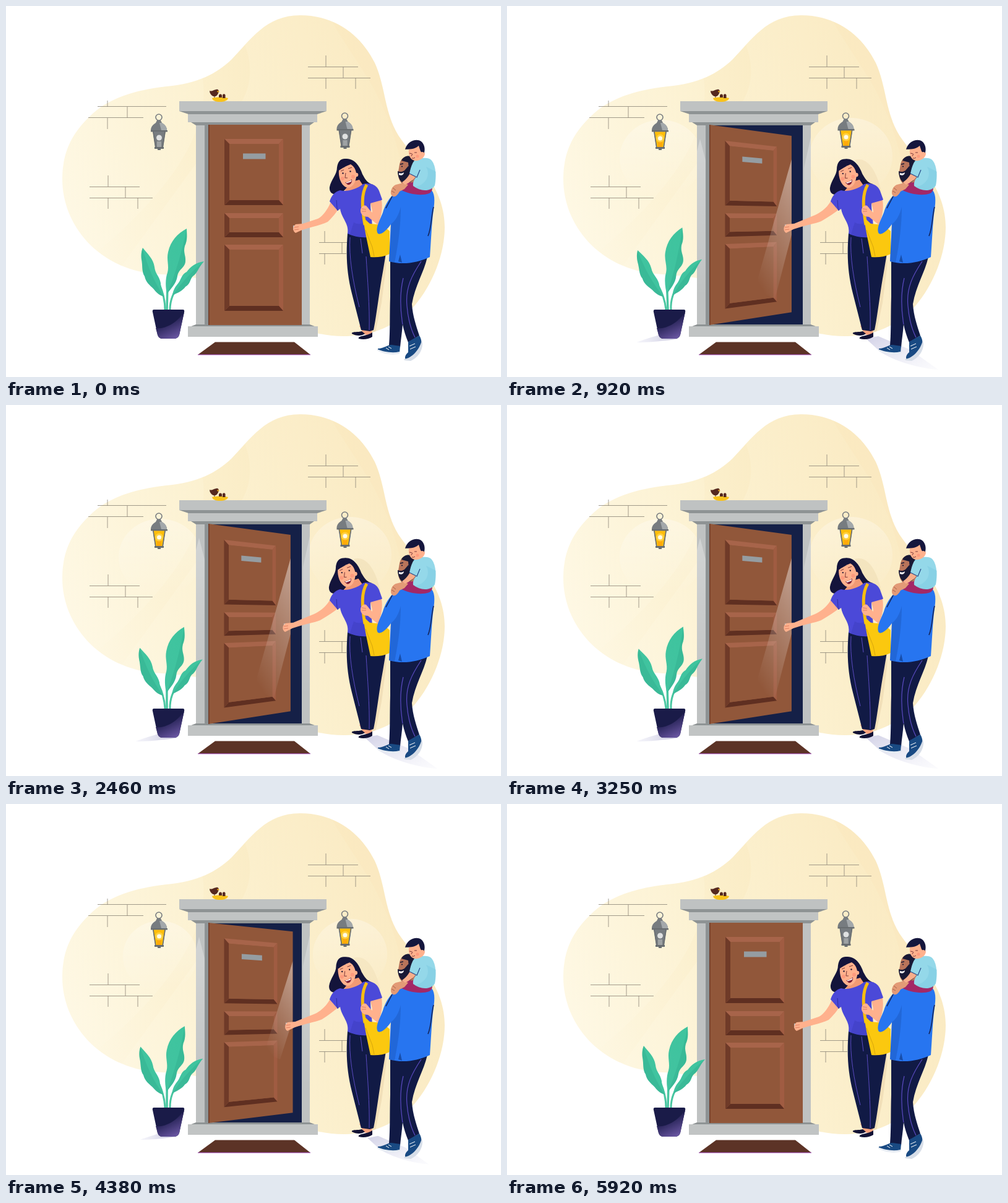
Write an HTML page that moves like this. It is 800 px wide and 600 px high and loops after 5960 ms.

```html
<!DOCTYPE html>
<html lang="en">
<head>
<meta charset="utf-8">
<title>Coming home</title>
<style>
html, body { margin: 0; width: 100%; height: 100%; overflow: hidden; background: #fff; }
svg { display: block; width: 800px; height: 600px; }
</style>
</head>
<body>
<svg viewBox="0 0 800 600" xmlns="http://www.w3.org/2000/svg">
<defs>
  <linearGradient id="wall" x1="0" y1=".6" x2="1" y2=".3">
    <stop offset="0" stop-color="#fef8e4"/><stop offset=".45" stop-color="#fcf1d0"/><stop offset="1" stop-color="#fae9c0"/>
  </linearGradient>
  <linearGradient id="streak" x1="0" y1="0" x2="1" y2="0">
    <stop offset="0" stop-color="#f6dfa8" stop-opacity="0"/><stop offset="1" stop-color="#f6dfa8" stop-opacity=".16"/>
  </linearGradient>
  <linearGradient id="halo" x1="0" y1="0" x2="0" y2="1">
    <stop offset="0" stop-color="#fff" stop-opacity=".3"/><stop offset="1" stop-color="#fff" stop-opacity="0"/>
  </linearGradient>
  <linearGradient id="beamFill" x1=".8" y1="0" x2=".35" y2="1">
    <stop offset="0" stop-color="#fff" stop-opacity=".42"/><stop offset="1" stop-color="#fff" stop-opacity="0"/>
  </linearGradient>
  <linearGradient id="potFill" x1=".35" y1=".3" x2=".7" y2="1">
    <stop offset="0" stop-color="#1c1b4b"/><stop offset="1" stop-color="#6b57a3"/>
  </linearGradient>
  <linearGradient id="leafFill" x1=".8" y1="0" x2=".3" y2="1">
    <stop offset="0" stop-color="#3ec49e"/><stop offset="1" stop-color="#42c3a0"/>
  </linearGradient>
  <linearGradient id="castR" x1="0" y1="0" x2="1" y2="1">
    <stop offset="0" stop-color="#b4b3d6" stop-opacity=".6"/><stop offset="1" stop-color="#d9d9ee" stop-opacity=".1"/>
  </linearGradient>
  <linearGradient id="castL" x1="1" y1="0" x2="0" y2="0">
    <stop offset="0" stop-color="#a5a3c8" stop-opacity=".7"/><stop offset="1" stop-color="#d9d9ee" stop-opacity=".25"/>
  </linearGradient>
  <clipPath id="wallClip"><path id="blob" d="M91 280C91 235 108 205 134 180C165 147 215 135 260 130C310 125 340 110 365 86C395 55 420 15 475 15C535 15 575 50 596 92C613 130 611 165 630 202C645 230 672 250 690 290C700 306 709 330 709 358C709 400 690 450 660 485C635 512 600 534 545 534C470 534 420 490 380 465C340 440 290 437 240 433C150 425 91 355 91 280Z"/></clipPath>
  <clipPath id="doorClip"><path id="doorMask"/></clipPath>
  <g id="lamp">
    <circle cx="247" cy="180" r="5" fill="none" stroke="#777c80" stroke-width="1.6"/>
    <path d="M244 185h6l2 4c5 3 8 7 8 12h-26c0-5 3-9 8-12z" fill="#777c80"/>
    <path d="M248 189h4c5 3 8 7 8 12h-9z" fill="#a3a8ab"/>
    <path d="M234 201h27v2.500h-27z" fill="#686d70"/>
    <path d="M237 203h21l-4 26h-13z" fill="#777c80"/>
    <path d="M244 219h7v9h-7z" fill="#9ea2a4"/>
    <circle cx="247.500" cy="213" r="4.500" fill="#dfe1e1"/>
  </g>
  <g id="bulb">
    <path d="M238 203.500h19l-4 25h-11z" fill="#ffbe0b"/>
    <path d="M244 219h7v9h-7z" fill="#ffa90a"/>
    <circle cx="247.500" cy="214" r="6.500" fill="#ffd95a" opacity=".7"/>
    <circle cx="247.500" cy="214" r="3.500" fill="#fffbe6"/>
  </g>
  <g id="lampFront">
    <path d="M238 203l4 26M257 203l-4 26" stroke="#686d70" stroke-width="1.400"/>
    <path d="M240 228h15v3h-15zM245 231h5v2h-5z" fill="#686d70"/>
  </g>
</defs>

<use href="#blob" fill="url(#wall)"/>
<g clip-path="url(#wallClip)">
  <path d="M385 60C405 110 390 150 365 175L180 430L120 420C260 310 350 190 310 90Z" fill="url(#streak)"/>
  <path d="M515 0C555 90 610 120 640 260L720 320V0Z" fill="#f7dfad" opacity=".16"/>
  <g id="halos">
    <ellipse class="halo" cx="249" cy="246" fill="url(#halo)"/>
    <ellipse class="halo" cx="556" cy="243" fill="url(#halo)"/>
  </g>
  <path d="M600 390C612 395 616 405 614 425L607 480L597 528H585L598 450Z" fill="#eedbb2" opacity=".7"/>
  <path id="headShade" d="M562 249C584 242 598 270 605 300L580 300C570 285 575 268 562 249Z" fill="#eedbb2"/>
</g>
<path d="M148 162.500H259M164 153v10M196 163v18M133 180.500H222M164 181v18M165 274v18M135 292.500H216M193 292v18M135 310.500H237M165 310v18M213 310v18M517 80v18M488 98.500H569M545 98v18M488 116.500H589M517 116v18M565 116v18M515 364v18M506 382.500H555M543 382v18M506 400.500H550M515 400v18" fill="none" stroke="#8b8577" stroke-width=".8"/>

<!-- frame -->
<path d="M327 192H479V517H327Z" fill="#152047"/>
<path d="M307 190h14v328h-14zM478 190h13v328h-13z" fill="#bfc2c2"/>
<path d="M321 190h6v327h-6z" fill="#8e9394"/>
<path d="M299 188H498L491 193H307Z" fill="#8e9394"/>
<path d="M294 172H503V188H294Z" fill="#c1c4c4"/>
<path d="M280 170H518L503 175H295Z" fill="#8e9394"/>
<path d="M280 154H518V170H280Z" fill="#bfc2c2"/>
<path d="M307 515H491L504 520H294Z" fill="#8e9394"/>
<path d="M294 518H504V535H294Z" fill="#c1c4c4"/>
<g id="jambLight" fill="url(#halo)">
  <path d="M312 215L321 250V470H307V235Z"/><path d="M491 212V470H480V262Z"/>
</g>

<!-- nest -->
<path d="M329 137C333 139 336 135 340 135C344 134 345 139 342 143C340 147 336 147 333 145C331 143 329 141 329 137Z" fill="#55281f"/>
<path d="M341 137l4 1l-3 2z" fill="#e9a817"/><path d="M337 146v4" stroke="#55281f"/>
<path d="M333 149C339 147 351 147 359 149C358 153 352 155 346 155C339 155 334 153 333 149Z" fill="#f8c21c"/>
<path d="M344 148v-3a2.500 2.500 0 0 1 5 0v3zM350 149v-5a2.300 2.300 0 0 1 4.500 0v5z" fill="#55281f"/>

<use href="#lamp"/><use href="#lamp" x="300.500" y="-2"/>
<g id="lit"><use href="#bulb"/><use href="#bulb" x="300.500" y="-2"/></g>
<use href="#lampFront"/><use href="#lampFront" x="300.500" y="-2"/>

<g id="door"></g>
<path id="beam" clip-path="url(#doorClip)" fill="url(#beamFill)"/>
<path d="M338 543.500H466L492 564H310Z" fill="#5c3326"/>
<path d="M310 564H492" stroke="#a64fc4" stroke-width="1.200"/>

<!-- plant -->
<path id="potShade" d="M278 538L246 532C236 535 222 539 209 544C225 545 260 541 278 538Z" fill="url(#castL)"/>
<g id="leafL">
  <path d="M257 491C257 477 254 464 248 450" fill="none" stroke="#49c6a1" stroke-width="3"/>
  <path d="M221 391C229 401 238 409 240 422C241 433 248 437 250 448C250 456 255 463 255 470C246 467 242 462 238 457C233 452 226 447 224 437C219 430 221 419 219 410C218 402 219 396 221 391Z" fill="url(#leafFill)"/>
  <path id="veinL" d="M221 392C228 420 240 447 255 470C246 467 242 462 238 457C233 452 226 447 224 437C219 430 221 419 219 410C218 402 219 396 221 391Z" fill="#23967c" opacity=".22"/>
</g>
<g id="leafM">
  <path d="M260 491L261 455" stroke="#49c6a1" stroke-width="3.500"/>
  <path d="M292 360C277 368 266 380 262 398C259 410 264 420 261 431C257 442 258 456 260 466C266 457 275 450 277 437C279 425 289 424 290 413C291 404 286 399 289 388C294 378 292 368 292 360Z" fill="url(#leafFill)"/>
  <path d="M292 361C286 390 275 432 260 466C266 457 275 450 277 437C279 425 289 424 290 413C291 404 286 399 289 388C294 378 292 368 292 360Z" fill="#23967c" opacity=".22"/>
</g>
<g id="leafR">
  <path d="M265 491C265 478 269 464 281 450" fill="none" stroke="#49c6a1" stroke-width="3"/>
  <path d="M320 413C306 415 299 421 292 430C283 434 283 444 277 450C272 456 270 461 269 468C277 464 285 461 290 454C298 450 297 442 302 437C309 433 310 424 320 413Z" fill="url(#leafFill)"/>
  <path d="M320 413C301 428 285 446 269 468C277 464 285 461 290 454C298 450 297 442 302 437C309 433 310 424 320 413Z" fill="#23967c" opacity=".22"/>
</g>
<path d="M239 491H286Q289 491 288 495L280 532Q278 538 271 538H253Q247 538 245 532L237 495Q236 491 239 491Z" fill="#1a1b48"/>
<path d="M288 495L280 532Q278 538 271 538H253Q247 538 245 532L242 521C259 523 277 511 288 495Z" fill="url(#potFill)"/>

<!-- woman -->
<path id="ground" d="M580 538L600 534L652 556L697 588C668 587 625 574 603 559Z" fill="url(#castR)"/>
<path d="M571 517H592L591 533L578 531Z" fill="#f8a27d"/>
<path d="M552 368C549 405 551 433 559 465L574 524L588 526L594 524C599 500 603 462 609 430L614 400L589 368Z" fill="#111a45"/>
<path d="M582 405C584 440 588 485 587 524M556 374C554 405 560 443 571 487M573 376L576 400" fill="none" stroke="#5a4ac0"/>
<path d="M575 526L580 530C575 534 566 534 559 530C558 526 569 528 575 526ZM592 528V535C586 539 577 540 570 538C568 533 583 534 592 528Z" fill="#121235"/>
<g id="head">
  <path d="M549 247C540 246 536 253 535 261C535 273 525 281 523 293C522 302 529 306 535 303C542 302 547 299 551 294L576 299C584 297 588 291 593 289C583 286 580 279 576 272C571 257 562 246 549 247Z" fill="#14143b"/>
  <path d="M559 284L571 281L577 290C570 299 555 302 547 298Z" fill="#f29a74"/>
  <path d="M538 266C542 263 551 258 557 256C564 260 567 268 566 277C564 289 557 296 549 293C541 289 537 276 538 266Z" fill="#ffb18d"/>
  <circle cx="566" cy="273" r="3.300" fill="#ffb18d"/>
  <circle cx="544" cy="279" r="3" fill="#fb8570" opacity=".5"/><circle cx="561" cy="276" r="3" fill="#fb8570" opacity=".5"/>
  <path d="M548 285C552 285 556 283 559 280C560 286 556 290 552 289Z" fill="#7d2036"/><path d="M549 285C553 285 556 283 558.500 281L558 284L551 286.500Z" fill="#fff"/>
  <path d="M549 270l-1 8l4 0M541 267l5-2M553 263l6-2" fill="none" stroke="#6f2d31" stroke-width=".9"/>
  <circle cx="544.500" cy="270.500" r="1.200" fill="#201a38"/><circle cx="556.500" cy="267.500" r="1.200" fill="#201a38"/>
</g>
<path id="arm" fill="#ffb18d"/>
<path id="fingers" fill="none" stroke="#dd7f62" stroke-width="1"/>
<path d="M540 298C550 301 566 297 577 288C588 285 599 289 603 299L608 313C602 319 595 321 589 320C589 336 594 354 591 373C578 376 562 373 552 368C555 352 542 343 540 328L536 331L523 316C526 306 532 300 540 298Z" fill="#4b49d8"/>
<path d="M536 331C534 325 535 319 534 314" fill="none" stroke="#302ea0" stroke-width="1"/>
<path d="M562 350C570 355 580 352 588 345V373C578 375 564 373 556 369Z" fill="#3434ad" opacity=".3"/>
<path d="M583 289C574 303 575 325 580 354" fill="none" stroke="#f7bd12" stroke-width="5"/>
<path d="M577 342L588 352L608 354L620 364V401C610 406 598 407 589 406C585 386 580 366 577 342Z" fill="#fbc80f"/>
<path d="M581 362L592 390L595 405" fill="none" stroke="#d7a60c"/>
<path d="M589 319L607 314C609 326 607 340 601 354L585 341C578 341 573 337 573 331C573 325 578 321 582 323C586 327 588 331 592 334C592 328 590 324 589 319Z" fill="#ffb18d"/>
<path d="M575 328l7 1M575 332l7 0" stroke="#dd7f62"/>

<!-- man -->
<path d="M621 410L681 406C675 432 661 452 656 482C657 500 663 518 668 533L650 544C646 534 643 525 641 515C640 528 638 540 637 552L619 549C621 525 620 500 621 470Z" fill="#111a45"/>
<path d="M671 413C657 434 645 455 648 485C650 510 656 526 661 536M642 440C636 465 637 490 641 515" fill="none" stroke="#5a4ac0" stroke-width="1.200"/>
<path d="M601 554C611 554 616 548 623 548L637 550L636 561C627 565 609 561 601 557Z" fill="#194a83"/>
<path d="M600 555C610 559 624 562 636 559V562C624 566 608 562 600 557Z" fill="#e7ecf3"/>
<path d="M650 543L668 533C675 544 671 558 662 567L649 573C643 572 644 565 650 560Z" fill="#194a83"/>
<path d="M672 541C676 552 668 568 654 574L644 573L643 571C656 570 668 556 672 541Z" fill="#d7dee8"/>
<path d="M652 550l9-4M653 555l9-4M614 553l5 3M618 551l5 3" stroke="#fff" stroke-width="1"/>
<path d="M636 256C638 247 643 243 652 243L662 252L661 285L648 292C637 288 633 279 634 268Z" fill="#b9745a"/>
<path d="M639 250C643 241 655 240 661 248L662 282L655 262L651 264L650 253Z" fill="#191935"/>
<path d="M633 267C637 269 641 268 644 266L650 259L656 262L657 282L648 289C638 287 633 278 633 267Z" fill="#191935"/>
<path d="M635 270C638 271 641 271 643 269C643 273 639 275 635 273Z" fill="#fff"/>
<path d="M637 256l5-1" stroke="#191935" stroke-width="1.500"/><circle cx="640" cy="259.500" r="1.100" fill="#191935"/>
<path d="M637 297C650 302 669 305 685 295C694 302 693 315 691 330C688 350 687 380 685 406C664 416 640 419 619 413L622 353C615 363 606 371 601 368C596 360 604 347 609 334C614 317 625 302 637 297Z" fill="#2775f0"/>
<path d="M622 353C630 347 635 337 638 325C638 355 634 385 628 415L619 413Z" fill="#174da9" opacity=".35"/>
<path d="M624 308L614 327M691 325C687 340 688 358 682 372" fill="none" stroke="#14265d" stroke-width="1.600"/>
<path d="M634 413l3-11l3 13" fill="#174da9"/>
<path d="M642 288C650 284 666 285 684 288C691 291 690 300 684 303C670 308 651 304 637 297Z" fill="#a32866"/>
<path d="M642 286L650 289L644 296L636 300C632 308 627 310 624 307C619 302 624 291 630 289Z" fill="#e39a76"/>
<path d="M625 294l5 4M623 299l5 3" stroke="#a76548"/>
<path d="M656 265L668 270C660 280 652 286 645 289L640 285C650 278 652 272 656 265Z" fill="#f8ae8b"/>
<path d="M661 249C669 246 680 244 686 248C695 255 696 276 693 290C687 300 671 301 658 291C657 284 661 279 663 276L652 271C654 262 656 254 661 249Z" fill="#94d8e9"/>
<path d="M652 271L664 277L669 265" fill="none" stroke="#254989" stroke-width="1.200"/>
<path d="M679 260C687 274 678 290 660 293C674 301 690 300 693 290L695 268Z" fill="#65bcd5" opacity=".25"/>
<path d="M651 233C652 225 665 223 674 230L677 239C676 247 667 251 660 250C653 248 650 241 651 233Z" fill="#ffb18d"/>
<path d="M645 232C648 219 663 213 671 219C677 224 678 233 675 240L670 235L667 226C659 233 651 231 645 232Z" fill="#15163d"/>
<circle cx="673" cy="239" r="3" fill="#ffb18d"/><circle cx="665" cy="243" r="2.500" fill="#fb8570" opacity=".5"/>
<path d="M652 238l4 1M660 237l4 0M657 239l-2 4M656 246q3 1 5-1" fill="none" stroke="#6f2d31" stroke-width=".9"/>
</svg>
<script>
const LOOP = 5960, SWAY = LOOP / 3, MOVE = 1000, SHUT = 4000;
const el = id => document.getElementById(id);
const set = (node, name, value) => node.setAttribute(name, value);
const mix = (a, b, p) => a + (b - a) * p;
const clamp = x => Math.min(1, Math.max(0, x));
const ease = x => x < .5 ? 4 * x ** 3 : 1 - 4 * (1 - x) ** 3;

// Blend two paths that share the same commands.
function mixPath(a, b, p) {
  const ends = b.match(/[\d.]+/g);
  let i = 0;
  return a.replace(/[\d.]+/g, n => mix(+n, +ends[i++], p).toFixed(2));
}

const HINGE = 327, EYE = 342, DEPTH = .136;
function project(x, y, p) {
  const z = 1 + DEPTH * p * (x - HINGE) / 151;
  return [HINGE + (x - HINGE) / z, EYE + (y - EYE) / z];
}
const poly = (pts, p) => 'M' + pts.map(([x, y]) => project(x, y, p).map(n => n.toFixed(2)).join(' ')).join('L') + 'Z';
const box = (l, t, r, b) => [[l, t], [r, t], [r, b], [l, b]];

const faces = [];
function face(color, pts) {
  const path = document.createElementNS('http://www.w3.org/2000/svg', 'path');
  set(path, 'fill', color);
  el('door').append(path);
  faces.push([path, pts]);
}
function panel(l, t, r, b) {
  const outer = box(l, t, r, b), inner = box(l + 8, t + 8, r - 7, b - 8);
  ['#a7644a', '#a05c42', '#5f2f21', '#6f3a28'].forEach((color, i) => {
    const j = (i + 1) % 4;
    face(color, [outer[i], outer[j], inner[j], inner[i]]);
  });
  face('#91573a', inner);
}
const slab = box(327, 192, 478, 516);
face('#91573a', slab);
face('#6f3a28', box(327, 192, 328.5, 516));
panel(353, 215, 448, 322);
panel(353, 335, 448, 374);
panel(353, 386, 448, 493);
face('#959da2', box(383, 238.5, 419.5, 247.5));
face('#b8bcc0', box(464, 355, 470, 362));

const ARM = [
  'M526 314C521 328 512 340 504 344L480 352L468 353C463 357 463 364 468 367L479 362C495 357 510 354 520 349C528 342 533 334 538 328Z',
  'M524 314C518 326 508 333 498 338L464 352L452 353C446 356 446 364 451 367L463 361C480 355 498 352 508 348C520 341 530 334 538 328Z'
];
const FINGERS = ['M466 358L473 357M466 362L473 361', 'M449 358L456 357M449 362L456 361'];

const leaves = [['leafL', 5.8, 257, 491], ['leafM', 3.8, 260, 491], ['leafR', 3.6, 265, 491]];

function draw(t) {
  const p = ease(clamp(t / MOVE)) - ease(clamp((t - SHUT) / MOVE));
  const light = clamp(p * 2.2);

  for (const [path, pts] of faces) set(path, 'd', poly(pts, p));
  set(el('doorMask'), 'd', poly(slab, p));
  const edge = project(478, EYE, p)[0];
  const low = 275 + 185 * p ** 1.5, left = 478 - 78 * p;
  set(el('beam'), 'd', `M${edge} ${275 - 27 * p}L${left} ${low}L${left + 33 * p} ${low + 14 * p}L${edge} ${mix(275, 370, p)}Z`);
  set(el('beam'), 'opacity', light);

  set(el('arm'), 'd', mixPath(...ARM, p));
  set(el('fingers'), 'd', mixPath(...FINGERS, p));
  set(el('head'), 'transform', `translate(${-p} 0) rotate(${-1.6 * p} 565 295)`);

  for (const id of ['lit', 'halos', 'jambLight']) set(el(id), 'opacity', light);
  set(el('headShade'), 'opacity', .5 * p);
  for (const halo of document.querySelectorAll('.halo')) {
    set(halo, 'rx', mix(36, 67, p));
    set(halo, 'ry', mix(40, 62, p));
  }
  const grow = (id, x, y) => {
    const s = mix(.3, 1, p);
    set(el(id), 'transform', `translate(${x} ${y}) scale(${s}) translate(${-x} ${-y})`);
    set(el(id), 'opacity', light);
  };
  grow('ground', 608, 552);
  grow('potShade', 260, 537);

  const swing = (1 - Math.cos(2 * Math.PI * t / SWAY)) / 2;
  for (const [id, angle, x, y] of leaves) set(el(id), 'transform', `rotate(${-angle * swing} ${x} ${y})`);
}

const start = performance.now();
function tick() {
  draw((performance.now() - start) % LOOP);
  requestAnimationFrame(tick);
}
tick();
</script>
</body>
</html>
```
